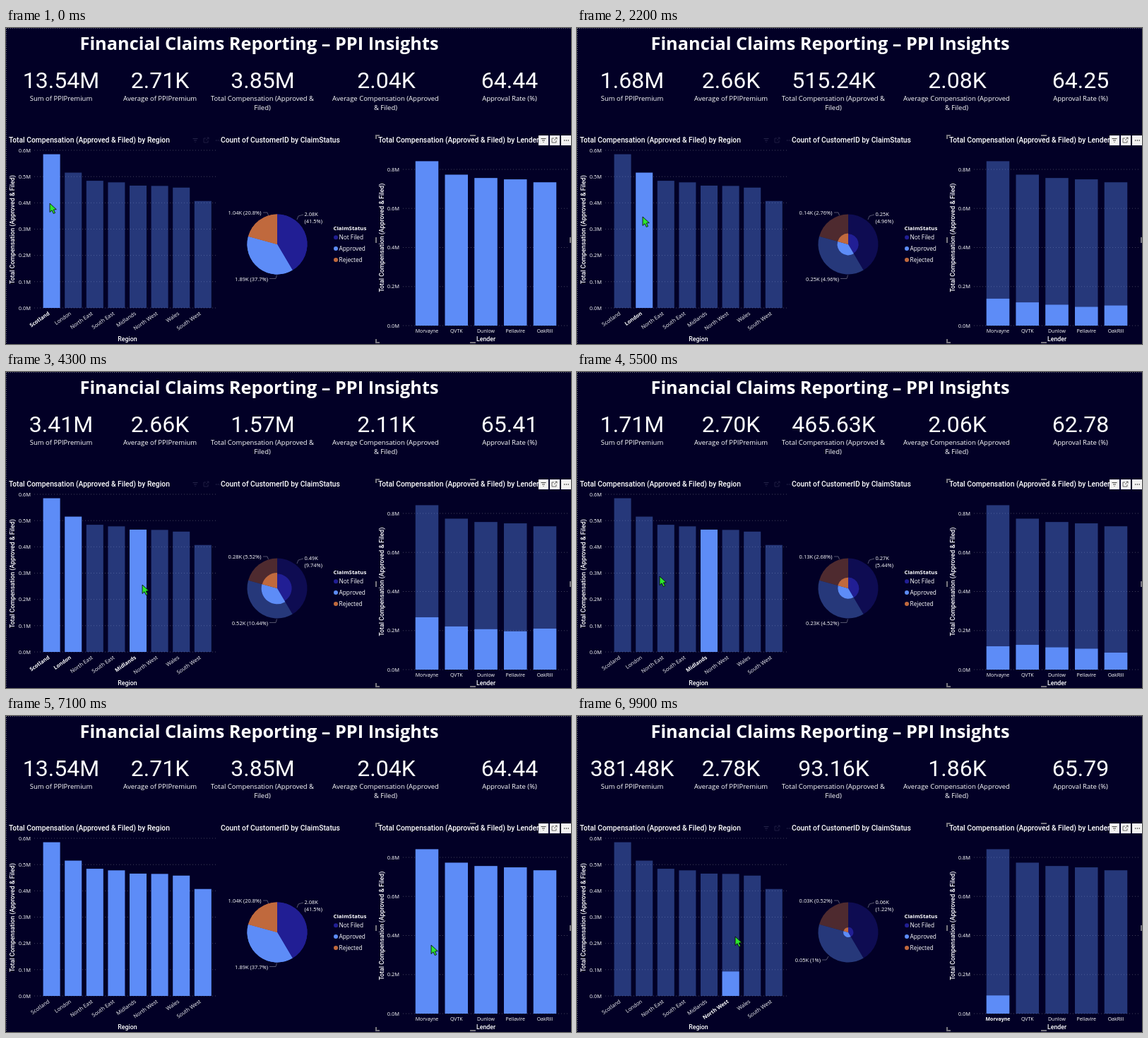
Animation, 800 px wide and 447 px high, one loop 10 s. Source, as an HTML page:

```html
<!DOCTYPE html>
<html lang="en">
<head>
<meta charset="utf-8">
<title>Financial Claims Reporting</title>
<style>
  html, body { margin: 0; width: 100%; height: 100%; overflow: hidden; background: #020026; }
  svg { display: block; width: 100vw; height: 100vh; fill: #fff; font-family: "Open Sans", "Noto Sans", sans-serif; }
  .din { font-family: Roboto, "Liberation Sans", sans-serif; }
  .head { font-size: 10.3px; font-weight: 500; }
  .axis { font-size: 8.8px; font-weight: 500; }
  .tick { font-size: 7.5px; }
</style>
</head>
<body>
<svg id="stage" viewBox="0 0 800 447"><g id="fixed"></g><g id="live"></g></svg>
<script>
const LOOP = 10000, STEP = 100, DIM = 0.4;
const BLUE = '#5d8cf7', GRID = '#ffffff50';
const PIE_COLORS = ['#211e94', BLUE, '#c0693d'];
const PIE_TOTALS = [2076, 1887, 1038], CLAIMS = 5000;

const region = {
  names: ['Scotland', 'London', 'North East', 'South East', 'Midlands', 'North West', 'Wales', 'South West'],
  full: [.585, .515, .484, .478, .4656, .4645, .458, .407],
  x: 64.6, gap: 30.6, width: 24, zero: 396, scale: 371.7
};
const lender = {
  names: ['Morvayne', 'QVTK', 'Dunlow', 'Pellavire', 'OakRill'],
  full: [.842, .773, .756, .749, .734],
  x: 596, gap: 41.75, width: 32.5, zero: 421, scale: 276.25
};

// Share of each selected region: amounts per lender and claim counts per status
const byRegion = {
  0: { lenders: [.13, .102, .1, .1, .107], pie: [239, 274, 138] },
  1: { lenders: [.138, .119, .107, .096, .103], pie: [248, 248, 138] },
  4: { lenders: [.1195, .127, .114, .107, .087], pie: [272, 226, 134] }
};
const firstLender = [.156, .125, .111, .108, .1, .093, .092, .084];

const only = (chart, picks, value) => chart.full.map((v, i) => picks.includes(i) ? value ?? v : 0);
const addUp = (picks, key) => picks.map(i => byRegion[i][key]).reduce((a, b) => a.map((v, i) => v + b[i]));
const clear = chart => ({ base: chart.full.map(() => 1), part: chart.full, glow: 0 });
const filtered = (chart, part) => ({ base: chart.full.map(() => DIM), part, glow: 1 });
const picked = (chart, picks) => ({
  base: chart.full.map((_, i) => picks.includes(i) ? 1 : DIM),
  part: only(chart, picks), glow: 0, instant: true
});

const pickRegions = (at, picks, cards) => ({
  at, cards, regions: picks, lenders: [], pie: addUp(picks, 'pie'),
  left: picked(region, picks), right: filtered(lender, addUp(picks, 'lenders'))
});
const unfiltered = at => ({
  at, cards: ['13.54M', '2.71K', '3.85M', '2.04K', '64.44'], regions: [], lenders: [], pie: PIE_TOTALS,
  left: { ...clear(region), instant: true }, right: clear(lender)
});

const states = [
  unfiltered(-5000),
  pickRegions(0, [0], ['1.73M', '2.66K', '584.42K', '2.13K', '66.50']),
  pickRegions(1500, [1], ['1.68M', '2.66K', '515.24K', '2.08K', '64.25']),
  pickRegions(2700, [0, 1], ['3.41M', '2.66K', '1.10M', '2.11K', '65.41']),
  pickRegions(4100, [0, 1, 4], ['5.12M', '2.67K', '1.57M', '2.11K', '64.59']),
  pickRegions(4750, [4], ['1.71M', '2.70K', '465.63K', '2.06K', '62.78']),
  unfiltered(6050),
  {
    at: 7690, cards: ['2.78M', '2.73K', '841.96K', '2.07K', '66.78'], regions: [], lenders: [0],
    pie: [411, 406, 202], left: filtered(region, firstLender), right: picked(lender, [0])
  },
  {
    at: 9100, cards: ['381.48K', '2.78K', '93.16K', '1.86K', '65.79'], regions: [5], lenders: [0],
    pie: [61, 50, 26], low: true,
    left: filtered(region, only(region, [5], .093)), right: filtered(lender, only(lender, [0], .093))
  }
];

// time, x, y of the pointer tip
const pointer = [
  [0, 62, 248], [1000, 62, 248], [1400, 93, 267], [2300, 93, 267], [2650, 64, 262], [3300, 64, 262],
  [3900, 193, 301], [4900, 193, 301], [5500, 117, 289], [5900, 187, 300], [6250, 187, 300],
  [6950, 602, 324], [7300, 602, 324], [7600, 600, 322], [8500, 600, 322], [9050, 224, 312], [LOOP, 224, 312]
];

const mix = (a, b, p) => a + (b - a) * p;
const ease = p => { p = Math.min(1, Math.max(0, p)); return p * p * (3 - 2 * p); };
const safe = s => s.replace(/&/g, '&amp;');
const text = (s, x, y, attrs = '') => `<text x="${x}" y="${y}" ${attrs}>${safe(s)}</text>`;
const rect = (x, y, w, h, attrs = '') => `<rect x="${x}" y="${y}" width="${w}" height="${h}" ${attrs}/>`;
const line = (d, color, attrs = '') => `<path d="${d}" fill="none" stroke="${color}" ${attrs}/>`;
const MID = 'text-anchor="middle"', END = 'text-anchor="end"';

function headerIcons(x, y, color) {
  return line(`M${x - 3.5} ${y - 2.5}h7m-5.5 2.5h4m-2.5 2.5h1`, color) +
    line(`M${x + 15} ${y - 3}h-3v6h6v-3m-3 0l4 -4m-2.5 0h2.5v2.5`, color, 'stroke-width=".8"') +
    line(`M${x + 29} ${y}h7`, color, 'stroke-width="1.3" stroke-dasharray="1.3 1.5"');
}

function axes(chart, left, right, tickX, step, count) {
  let out = '';
  for (let i = 0; i <= count; i++) {
    const y = chart.zero - i * step * chart.scale;
    out += line(`M${left} ${y.toFixed(1)}H${right}`, GRID, 'stroke-width=".8" stroke-dasharray="1 3"') +
      text((i * step).toFixed(1) + 'M', tickX, (y + 2.7).toFixed(1), `class="tick" ${END}`);
  }
  return out;
}

function drawFixed() {
  const amount = 'Total Compensation (Approved & Filed)';
  const labels = [
    [78, 'Sum of PPIPremium'], [218, 'Average of PPIPremium'],
    [363, 'Total Compensation (Approved &', 'Filed)'],
    [537.5, 'Average Compensation (Approved', '& Filed)'], [713, 'Approval Rate (%)']
  ];
  let out = line('M0 .5H800M.5 0V447', '#ffffff70', 'stroke-dasharray="1 2"');
  out += text('Financial Claims Reporting – PPI Insights', 358.5, 31, `font-size="25.3" font-weight="700" ${MID}`);
  for (const [x, ...lines] of labels)
    lines.forEach((s, i) => out += text(s, x, 103 + i * 13, `font-size="9.5" ${MID}`));

  out += text(amount + ' by Region', 4, 161.5, 'class="din head"') +
    text('Count of CustomerID by ClaimStatus', 304, 161.5, 'class="din head"') +
    text(amount + ' by Lender', 527, 161.5, 'class="din head"');
  for (const x of [754, 770, 786]) out += rect(x, 152, 14, 14, 'fill="#f3f2f1"');
  out += headerIcons(761, 159, '#444');

  out += axes(region, 40, 298, 35, .1, 6) + axes(lender, 562, 796, 557, .2, 4);
  for (const [x, y] of [[12, 285], [535, 296.5]])
    out += text(amount, 0, 0, `class="din axis" ${MID} transform="translate(${x} ${y}) rotate(-90)"`);
  out += text('Region', 172, 443, `class="din axis" ${MID}`) + text('Lender', 679.5, 443, `class="din axis" ${MID}`);

  const handles = [[523, 151, 6, 2], [523, 151, 2, 6], [657, 151, 8, 2], [523, 296, 2, 8], [798, 296, 2, 8],
    [523, 444, 6, 2], [523, 440, 2, 6], [657, 444, 8, 2]];
  for (const h of handles) out += rect(...h, 'fill="#77757f"');

  out += text('ClaimStatus', 463.5, 286, 'font-size="7.8" font-weight="700"');
  ['Not Filed', 'Approved', 'Rejected'].forEach((s, i) => {
    const y = 296.3 + i * 15.8;
    out += `<circle cx="467" cy="${y}" r="3" fill="${PIE_COLORS[i]}"/>` + text(s, 471.5, y + 3, 'font-size="8.3"');
  });
  return out;
}

function bars(chart, from, to, p) {
  if (to.instant) p = 1;
  const glow = mix(from.glow, to.glow, p);
  return chart.full.map((v, i) => {
    const x = chart.x + i * chart.gap - chart.width / 2;
    const bar = (value, opacity) => rect(x.toFixed(2), (chart.zero - value * chart.scale).toFixed(2), chart.width,
      (value * chart.scale).toFixed(2), `fill="${BLUE}" fill-opacity="${opacity.toFixed(3)}"`);
    return bar(v, mix(from.base[i], to.base[i], p)) + bar(mix(from.part[i], to.part[i], p), glow);
  }).join('');
}

function pie(from, to, p, shown) {
  const cx = 384, cy = 306, R = 42.5, sum = PIE_TOTALS.reduce((a, b) => a + b);
  const slice = (a, b, r, attrs) => {
    const at = f => `${(cx + r * Math.sin(f * 2 * Math.PI)).toFixed(2)} ${(cy - r * Math.cos(f * 2 * Math.PI)).toFixed(2)}`;
    return `<path d="M${cx} ${cy}L${at(a)}A${r} ${r} 0 0 1 ${at(b)}Z" ${attrs}/>`;
  };
  const share = (s, i) => Math.sqrt(s.pie[i] / PIE_TOTALS[i]);
  const full = shown.pie === PIE_TOTALS;
  let start = 0, out = '';
  PIE_TOTALS.forEach((n, i) => {
    const end = start + n / sum, fill = `fill="${PIE_COLORS[i]}"`;
    out += slice(start, end, R, `${fill} fill-opacity="${full ? 1 : DIM}"`);
    out += slice(start, end, +(R * mix(share(from, i), share(to, i), p)).toFixed(2), fill);
    start = end;
  });

  const label = shown.pie.map(n => {
    const pct = n / CLAIMS * 100;
    return [+(n / 1000).toFixed(2) + 'K', `(${+pct.toFixed(pct > 20 ? 1 : 2)}%)`];
  });
  const [bx, by] = shown.low ? [345, 347.5] : [371, 357.5];
  const lead = shown.low ? 'M347 345h6l3 -5' : 'M373 354.5h9l1.5 -5';
  return out + line(`M364 261h6l1.5 4M412 271l2 -5l7 -2${lead}`, '#77778c', 'stroke-width=".7"') +
    text(label[2].join(' '), 361.5, 263.7, `class="tick" ${END}`) +
    text(label[1].join(' '), bx, by, `class="tick" ${END}`) +
    text(label[0][0], 422.5, 266.3, 'class="tick"') + text(label[0][1], 422.5, 276, 'class="tick"');
}

function categoryLabels(state) {
  const weight = on => on ? 'font-weight="700"' : '';
  return region.names.map((s, i) => text(s, 0, 0, `class="tick" ${END} ${weight(state.regions.includes(i))} ` +
      `transform="translate(${(region.x + i * region.gap - 2.3).toFixed(1)} 405) rotate(-35)"`)).join('') +
    lender.names.map((s, i) => text(s, lender.x + i * lender.gap, 430.5,
      `font-size="7" ${MID} ${weight(state.lenders.includes(i))}`)).join('');
}

function pointerAt(t) {
  const i = pointer.findIndex(k => k[0] > t), [t0, x0, y0] = pointer[i - 1], [t1, x1, y1] = pointer[i];
  const p = ease((t - t0) / (t1 - t0));
  return [mix(x0, x1, p), mix(y0, y1, p)];
}

function drawLive(t) {
  const n = states.findLastIndex(s => s.at <= t), now = states[n], before = states[n - 1];
  const age = t - now.at, p = ease((age - 300) / 400);
  const shown = age >= 300 ? now : before;
  const [x, y] = pointerAt(t);
  let out = '';
  [78, 218, 363.5, 538.5, 713].forEach((cx, i) => {
    const delay = i === 2 || i === 3 ? 150 : 350;
    out += text((age >= delay ? now : before).cards[i], cx, 85, `class="din" font-size="32" ${MID}`);
  });
  out += bars(region, before.left, now.left, p) + bars(lender, before.right, now.right, p);
  out += pie(before, now, p, shown) + categoryLabels(now);
  if (x < 301) out += headerIcons(268, 159, '#26254a');
  return out + `<path transform="translate(${x.toFixed(1)} ${y.toFixed(1)})" fill="#2ee62e" stroke="#000" stroke-width=".8"
    d="M0 0V12.5L3 9.8L5.3 14.5L7.6 13.5L5.4 9L9.3 8.6Z"/>`;
}

const live = document.getElementById('live');
document.getElementById('fixed').innerHTML = drawFixed();
const began = performance.now();
let lastTick = -1;
function frame() {
  const tick = Math.floor(Math.max(0, performance.now() - began) % LOOP / STEP);
  if (tick !== lastTick) live.innerHTML = drawLive((lastTick = tick) * STEP);
  requestAnimationFrame(frame);
}
frame();
</script>
</body>
</html>
```
